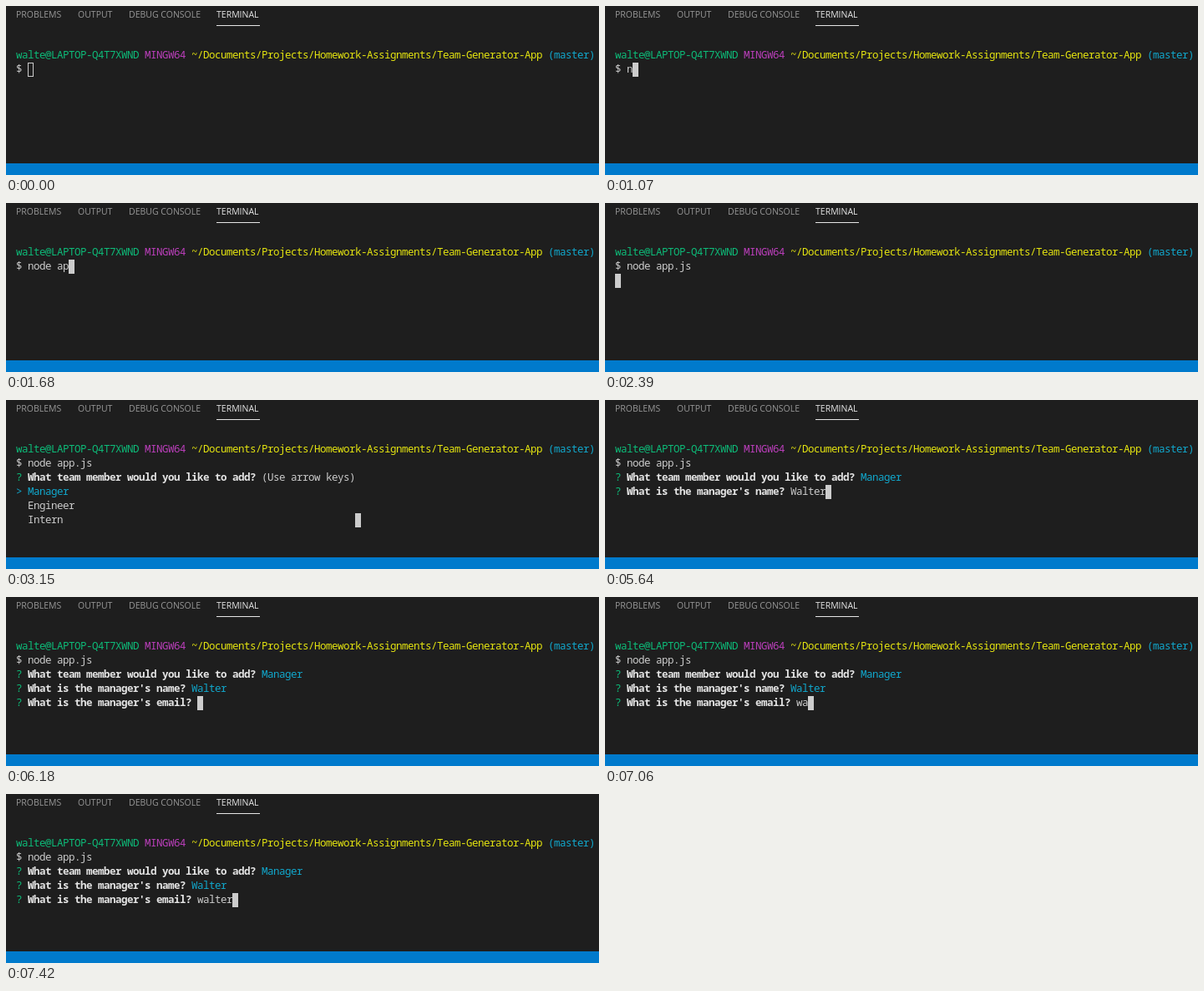
An HTML page with a canvas for the animation above (8 s loop, 710 by 203 pixels).

```html
<!DOCTYPE html>
<html lang="en">
<head>
<meta charset="utf-8">
<title>Terminal session</title>
<style>
  html, body { margin: 0; width: 100%; height: 100%; overflow: hidden; background: #1e1e1e; }
  canvas { display: block; }
</style>
</head>
<body>
<canvas id="stage" width="710" height="203"></canvas>
<script>
const ctx = document.getElementById('stage').getContext('2d');
const LOOP = 8000;
const LEFT = 12, TOP = 51, CELL = 7, ROW = 17, BASE = 12;
const MONO = '12.5px "Noto Sans Mono", monospace';
const UI = '10.5px "Open Sans", sans-serif';
const C = {
  bg: '#1e1e1e', bar: '#007acc', fg: '#cccccc', white: '#e5e5e5', tab: '#979797', active: '#e7e7e7',
  green: '#0dbc79', magenta: '#bc3fbc', yellow: '#e5e510', cyan: '#11a8cd'
};

const COMMAND = 'node app.js', NAME = 'Walter', EMAIL = 'walter';

// Moments at which each character appears
const commandKeys = [1070, 1220, 1300, 1450, 1530, 1600, 1680, 1850, 2000, 2070, 2240];
const nameKeys = [5190, 5270, 5340, 5420, 5490, 5640];
const emailKeys = [6890, 6980, 7070, 7160, 7240, 7420];

const typed = (text, keys, t) => text.slice(0, keys.filter(k => k <= t).length);
const within = (t, from, to) => t >= from && t < to;

// Writes on the character grid and returns the next free column
function write(row, col, text, color, bold) {
  ctx.font = (bold ? 'bold ' : '') + MONO;
  ctx.fillStyle = color;
  for (const ch of text) {
    if (ch !== ' ') ctx.fillText(ch, LEFT + col * CELL, TOP + row * ROW + BASE);
    col++;
  }
  return col;
}

function cursor(row, col, hollow) {
  const x = LEFT + col * CELL, y = TOP + row * ROW;
  if (hollow) {
    ctx.strokeStyle = C.fg;
    ctx.lineWidth = 1;
    ctx.strokeRect(x + 0.5, y + 0.5, CELL - 1, ROW - 1);
  } else {
    ctx.fillStyle = C.fg;
    ctx.fillRect(x, y, CELL, ROW);
  }
}

function ask(row, question) {
  write(row, 0, '?', C.green);
  return write(row, 2, question, C.white, true) + 1;
}

function drawPanel() {
  ctx.fillStyle = C.bg;
  ctx.fillRect(0, 0, 710, 203);
  ctx.fillStyle = C.bar;
  ctx.fillRect(0, 189, 710, 14);
  ctx.font = UI;
  const tabs = [['PROBLEMS', 12], ['OUTPUT', 86], ['DEBUG CONSOLE', 147], ['TERMINAL', 252]];
  for (const [label, x] of tabs) {
    ctx.fillStyle = label === 'TERMINAL' ? C.active : C.tab;
    ctx.fillText(label, x, 14);
  }
  ctx.fillStyle = C.active;
  ctx.fillRect(252, 23, 52, 1);
}

function drawPrompt() {
  write(0, 0, 'walte@LAPTOP-Q4T7XWND', C.green);
  write(0, 22, 'MINGW64', C.magenta);
  write(0, 30, '~/Documents/Projects/Homework-Assignments/Team-Generator-App', C.yellow);
  write(0, 91, '(master)', C.cyan);
  write(1, 0, '$', C.fg);
}

function drawCommand(t) {
  const end = write(1, 2, typed(COMMAND, commandKeys, t), C.fg);
  if (t < 2390) cursor(1, end, t < 590);
  else if (t < 3150) cursor(2, 0);
}

function drawRole(t) {
  if (t < 3150) return;
  const col = ask(2, 'What team member would you like to add?');
  if (t < 4180) {
    const end = write(2, col, '(Use arrow keys)', C.fg);
    write(3, 0, '> Manager', C.cyan);
    write(4, 2, 'Engineer', C.fg);
    write(5, 2, 'Intern', C.fg);
    cursor(5, end);
  } else {
    write(2, col, 'Manager', C.cyan);
    if (t < 4250) cursor(3, 0);
  }
}

function drawName(t) {
  if (t < 4250) return;
  // The line is wiped for a moment before the answer is reprinted
  if (within(t, 5950, 6100)) return cursor(3, 0);
  const col = ask(3, "What is the manager's name?");
  const end = write(3, col, typed(NAME, nameKeys, t), t < 5950 ? C.fg : C.cyan);
  if (t < 5950) cursor(3, end);
  else if (t < 6180) cursor(4, 0);
}

function drawEmail(t) {
  if (t < 6180) return;
  if (within(t, 7330, 7420)) return cursor(4, 0);
  const col = ask(4, "What is the manager's email?");
  cursor(4, write(4, col, typed(EMAIL, emailKeys, t), C.fg));
}

const start = performance.now();
function frame() {
  const t = (performance.now() - start) % LOOP;
  drawPanel();
  drawPrompt();
  drawCommand(t);
  drawRole(t);
  drawName(t);
  drawEmail(t);
  requestAnimationFrame(frame);
}
frame();
</script>
</body>
</html>
```
